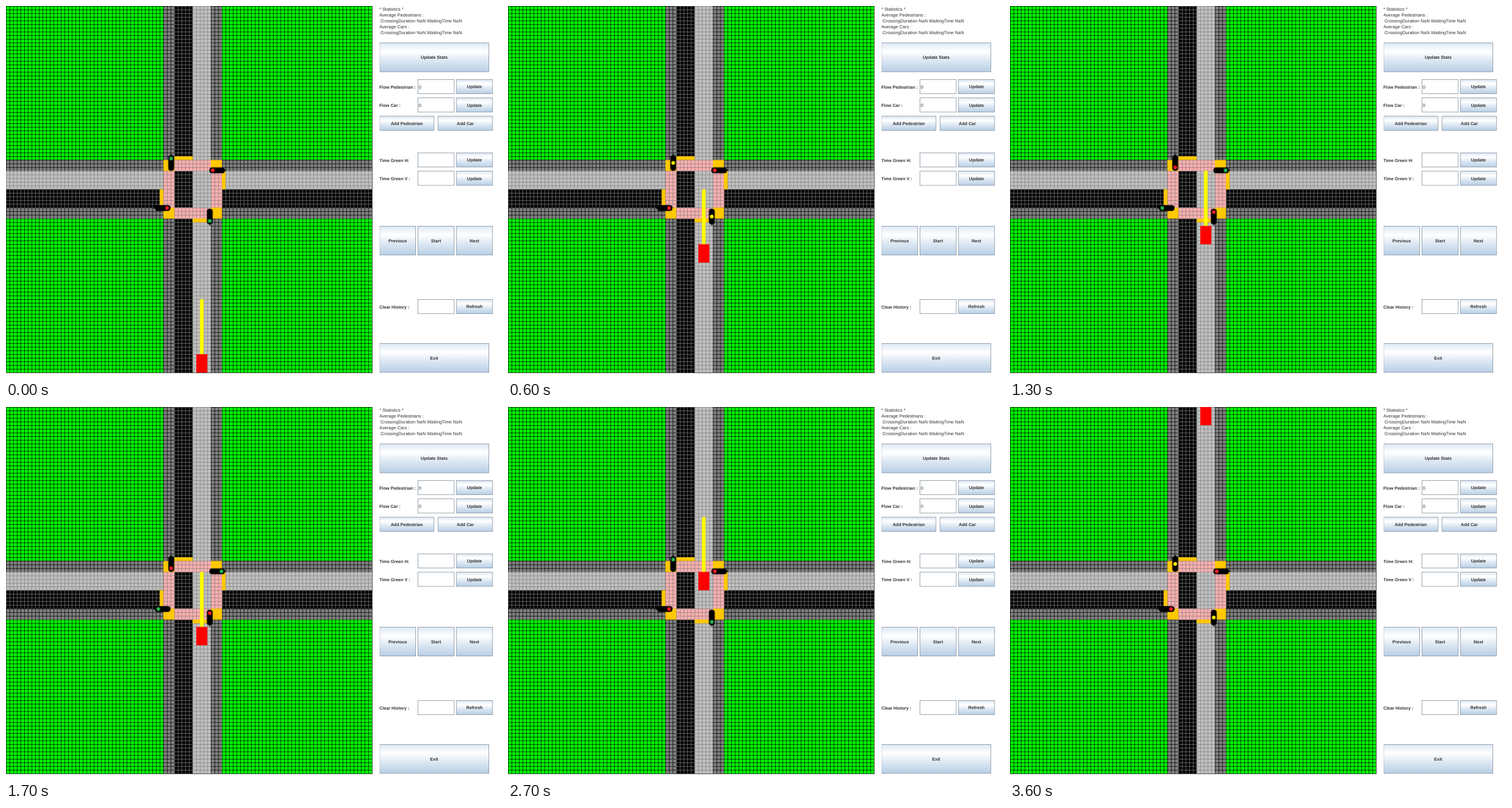
An HTML page for the animation above (3700 ms loop, 847 by 636 pixels).

```html
<!DOCTYPE html>
<html lang="en">
<head>
<meta charset="utf-8">
<title>Crossroad simulation</title>
<style>
  html, body { margin: 0; width: 100%; height: 100%; overflow: hidden; background: #fff; }
  svg { display: block; width: 847px; height: 636px; }
  text {
    font: 9.9px "Liberation Sans", Arial, sans-serif;
    fill: #333; white-space: pre; text-rendering: geometricPrecision;
  }
  .bold { font-weight: bold; font-size: 9.6px; }
  .mid { text-anchor: middle; }

  /* a small head start keeps steps clear of rounding at tick borders */
  .car, .lamp { animation: 3700ms -10ms infinite step-end; }
  .car { animation-name: drive; }
  .v .lamp { animation-name: vertical; }
  .h .lamp { animation-name: horizontal; }

  /* 40 units per 100 ms tick, waiting at the red light */
  @keyframes drive {
    0% { transform: translateY(0); animation-timing-function: steps(7); }
    18.9189% { transform: translateY(-280px); animation-timing-function: step-end; }
    64.8649% { transform: translateY(-280px); animation-timing-function: steps(12); }
    97.2973%, 100% { transform: translateY(-760px); }
  }
  @keyframes vertical {
    0%, 67.5676% { transform: translateX(9.6px); fill: #22b14c; }
    8.1081%, 94.5946%, 100% { transform: translateX(0); fill: #fff200; }
    24.3243% { transform: translateX(-9.6px); fill: #ed1c24; }
  }
  @keyframes horizontal {
    0%, 67.5676%, 100% { transform: translateX(-9.6px); fill: #ed1c24; }
    24.3243% { transform: translateX(9.6px); fill: #22b14c; }
    51.3514% { transform: translateX(0); fill: #fff200; }
  }
</style>
</head>
<body>
<svg viewBox="0 0 1084.16 814.08">
  <defs>
    <linearGradient id="steel" x2="0" y2="1">
      <stop offset="0" stop-color="#dde8f3"/>
      <stop offset=".3" stop-color="#fff"/>
      <stop offset=".6" stop-color="#dde8f3"/>
      <stop offset="1" stop-color="#b8cfe5"/>
    </linearGradient>
  </defs>
  <g id="map"></g>
  <g class="car">
    <rect x="424" y="640" width="8" height="120" fill="#ff0"/>
    <rect x="416" y="760" width="24" height="40" fill="#f00"/>
  </g>
  <g id="signals"></g>
  <g id="panel"></g>
</svg>
<script>
const CELL = 8;
const map = document.getElementById('map');
const signals = document.getElementById('signals');
const panel = document.getElementById('panel');

function add(parent, tag, attrs, text) {
  const el = document.createElementNS('http://www.w3.org/2000/svg', tag);
  for (const key in attrs) el.setAttribute(key, attrs[key]);
  if (text) el.textContent = text;
  parent.append(el);
  return el;
}

// A block of cells, with grid lines on the upper and left side of each cell
function area(col, row, cols, rows, fill, line) {
  const x = col * CELL, y = row * CELL, width = cols * CELL, height = rows * CELL;
  add(map, 'rect', { x, y, width, height, fill });
  if (!line) return;
  let d = '';
  for (let i = 0; i < cols; i++) d += `M${x + i * CELL + .5} ${y}v${height}`;
  for (let i = 0; i < rows; i++) d += `M${x} ${y + i * CELL + .5}h${width}`;
  add(map, 'path', { d, stroke: line, fill: 'none' });
}

const WALK = '#808080', LANE = '#c0c0c0', PINK = '#ffafaf', ORANGE = '#ffc800';

area(0, 0, 100, 100, '#0f0', '#000');
add(map, 'path', { d: 'M800.5 0V801M0 800.5H801', stroke: '#000' });

// Horizontal road, then vertical road
area(0, 42, 100, 3, WALK, '#000');
area(0, 45, 100, 5, LANE, WALK);
area(0, 50, 100, 5, '#000', WALK);
area(0, 55, 100, 3, WALK, '#000');
area(43, 0, 3, 100, WALK, '#000');
area(46, 0, 5, 100, '#000', WALK);
area(51, 0, 5, 100, LANE, WALK);
area(56, 0, 3, 100, WALK, '#000');

// Pedestrian crossings
area(46, 42, 10, 3, PINK, WALK);
area(46, 55, 10, 3, PINK, WALK);
area(43, 45, 3, 10, PINK, WALK);
area(56, 45, 3, 10, PINK, WALK);

// Waiting corners and stop lines
for (const col of [43, 56]) for (const row of [42, 55]) area(col, row, 3, 3, ORANGE);
area(46, 41, 5, 1, ORANGE);
area(51, 58, 5, 1, ORANGE);
area(42, 50, 1, 5, ORANGE);
area(59, 45, 1, 5, ORANGE);

function signal(axis, x, y, angle) {
  const g = add(signals, 'g', { class: axis, transform: `translate(${x} ${y}) rotate(${angle})` });
  add(g, 'rect', { x: 15, y: -1, width: 5, height: 2 });
  add(g, 'rect', { x: -17, y: -6.5, width: 34, height: 13, rx: 5.5 });
  add(g, 'circle', { class: 'lamp', r: 4 });
}
signal('v', 361, 342.5, -90);
signal('v', 445.5, 459.5, 90);
signal('h', 461.5, 358.6, 0);
signal('h', 342.5, 441, 180);

function box(x, y, w, h, fill) {
  add(panel, 'rect', { x: x + .5, y: y + .5, width: w - 1, height: h - 1, fill, stroke: '#7a8a99' });
}
function button(label, x, y, w, h = 32) {
  box(x, y, w, h, 'url(#steel)');
  add(panel, 'text', { class: 'bold mid', x: x + w / 2, y: y + h / 2 + 3.6 }, label);
}
function field(label, y, action, value) {
  add(panel, 'text', { class: 'bold', x: 816, y: y + 20 }, label);
  box(900, y, 80, 32, '#fff');
  if (value) add(panel, 'text', { x: 902, y: y + 20 }, value);
  button(action, 984, y, 80);
}

['* Statistics *', 'Average Pedestrians :', 'CrossingDuration NaN WaitingTime NaN',
 'Average Cars :', 'CrossingDuration NaN WaitingTime NaN'].forEach((line, i) =>
  add(panel, 'text', { x: line[1] === 'r' ? 818.6 : 816, y: 10.6 + 12.8 * i }, line));

button('Update Stats', 816, 80, 240, 64);
field('Flow Pedestrian :', 160, 'Update', '0');
field('Flow Car :', 200, 'Update', '0');
button('Add Pedestrian', 816, 240, 120);
button('Add Car', 944, 240, 120);
field('Time Green H:', 320, 'Update');
field('Time Green V :', 360, 'Update');
button('Previous', 816, 480, 80, 64);
button('Start', 900, 480, 80, 64);
button('Next', 984, 480, 80, 64);
field('Clear History :', 640, 'Refresh');
button('Exit', 816, 736, 240, 64);
</script>
</body>
</html>
```
